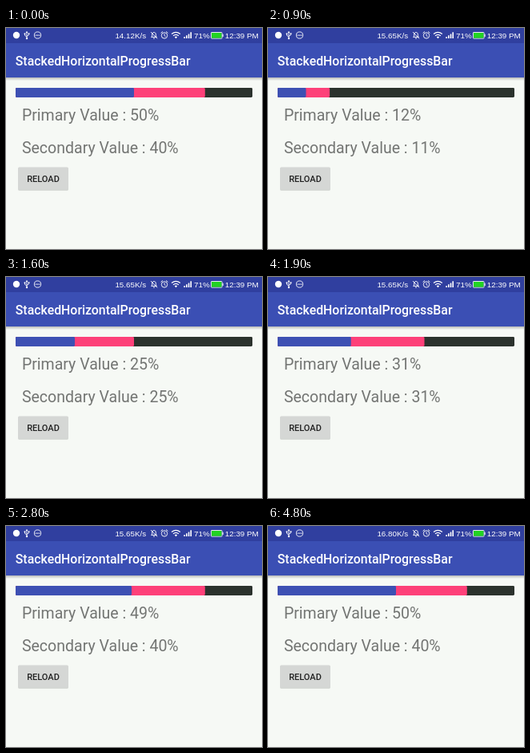
An HTML page that plays this animation: 320x277 px, repeating every 4.9 s.

```html
<!DOCTYPE html>
<html lang="en">
<head>
<meta charset="utf-8">
<title>Stacked progress bar</title>
<style>
  html, body { margin: 0; width: 100%; height: 100%; overflow: hidden; background: #f6f9f5; }
  svg { display: block; width: 100%; height: 100%; font-family: Roboto, "Noto Sans", sans-serif; }
  .status { font: 9.8px "Liberation Sans", Arial, sans-serif; fill: #fff; }
  .title { font-size: 15.85px; font-weight: 500; fill: #fff; }
  .label { font-size: 19.55px; fill: #737573; }
  .button { font-size: 11px; font-weight: 500; fill: #222; }
  .line { fill: none; stroke: #fff; stroke-width: .9; }
  .solid { fill: #fff; }
</style>
</head>
<body>
<svg viewBox="0 0 320 277">
  <defs>
    <linearGradient id="shade" x2="0" y2="1">
      <stop offset="0" stop-color="#000" stop-opacity=".25"/>
      <stop offset="1" stop-color="#000" stop-opacity="0"/>
    </linearGradient>
    <filter id="lift" x="-10%" y="-10%" width="120%" height="130%">
      <feDropShadow dx="0" dy=".8" stdDeviation=".7" flood-opacity=".3"/>
    </filter>
  </defs>

  <rect width="320" height="277" fill="#f6f9f5"/>
  <rect y="62" width="320" height="4" fill="url(#shade)"/>
  <rect width="320" height="62" fill="#3b4fb4"/>
  <rect width="320" height="19" fill="#303f9f"/>

  <!-- status icons, left -->
  <circle class="solid" cx="13" cy="9" r="4.2"/>
  <g class="line">
    <path d="M26 5V13M23.5 7.5V9.3L26 11M28.5 7V8.8L26 10.3"/>
    <circle cx="39.5" cy="9" r="4.1"/>
  </g>
  <path class="solid" d="M24.6 6L26 3.8 27.4 6zM27.7 6.2h1.7v1.7h-1.7z"/>
  <circle class="solid" cx="23.5" cy="7.2" r="1"/>
  <circle class="solid" cx="26" cy="13" r="1.2"/>
  <path class="solid" d="M36.9 8.4h1.3v1.3h-1.3zM38.9 8.4h1.3v1.3h-1.3zM40.9 8.4h1.3v1.3h-1.3z"/>

  <!-- status icons, right -->
  <g class="line">
    <path d="M181.6 11.4H188.4L187.3 10V8C187.3 4.6 182.7 4.6 182.7 8V10ZM184 13H186M181 5L189 13.3"/>
    <circle cx="198" cy="9.4" r="3.7"/>
    <path d="M198 7.3V9.6L199.5 10.6M193.6 6.3L196 4.4M202.4 6.3L200 4.4"/>
    <path d="M207 7.6Q212.4 3.2 217.8 7.6M209 9.7Q212.4 6.9 215.8 9.7" stroke-width="1.3"/>
    <rect x="256.4" y="5.5" width="13.6" height="7.6" rx=".6"/>
  </g>
  <path class="solid" d="M210.7 11.3Q212.4 9.9 214.1 11.3L212.4 13.2zM222.3 11h1.6v2h-1.6zM225 9.3h1.6v3.7h-1.6zM227.7 7.4h1.6v5.6h-1.6zM230.4 5.3h1.6v7.7h-1.6zM270.4 7.7h1.2v3.2h-1.2z"/>
  <rect x="257" y="6" width="12.4" height="6.6" fill="#22d322"/>
  <text id="speed" class="status" x="136.4" y="13">14.12K/s</text>
  <text class="status" x="235" y="13">71%</text>
  <text class="status" x="273.8" y="13">12:39 PM</text>

  <text class="title" x="11.8" y="47">StackedHorizontalProgressBar</text>

  <!-- stacked bar -->
  <rect x="12" y="75" width="296" height="12" rx="1.4" fill="#2b322d"/>
  <rect id="second" x="12" y="75" height="12" rx="1.4" fill="#fd4079"/>
  <rect id="first" x="12" y="75" height="12" rx="1.4" fill="#3d50b3"/>

  <text id="primary" class="label" x="19.9" y="115.8"></text>
  <text id="secondary" class="label" x="19.9" y="157.4"></text>

  <rect x="15" y="174.6" width="63" height="28" rx="1.6" fill="#d5d7d5" filter="url(#lift)"/>
  <text class="button" x="46.5" y="193" text-anchor="middle">RELOAD</text>
</svg>
<script>
  const LOOP = 4900, TICK = 100, START = 300, SPEED_CHANGE = 3200;
  const RATE = 1.945; // percent per tick
  const BAR = 296;
  const el = id => document.getElementById(id);
  const parts = Object.fromEntries(
    ['speed', 'first', 'second', 'primary', 'secondary'].map(id => [id, el(id)]));

  function setText(node, text) {
    if (node.textContent !== text) node.textContent = text;
  }

  function draw(time) {
    const t = time % LOOP;
    const running = t >= START;
    const count = running ? Math.floor((t - START) / TICK) * RATE : 100;
    const p = Math.min(50, Math.round(count));
    const s = Math.min(40, Math.floor(count));

    parts.first.setAttribute('width', BAR * p / 100);
    parts.second.setAttribute('width', BAR * s * 2 / 100);
    setText(parts.primary, `Primary Value : ${p}%`);
    setText(parts.secondary, `Secondary Value : ${s}%`);
    setText(parts.speed, !running ? '14.12K/s' : t < SPEED_CHANGE ? '15.65K/s' : '16.80K/s');
  }

  const begin = performance.now();
  function frame() {
    draw(performance.now() - begin);
    requestAnimationFrame(frame);
  }
  frame();
</script>
</body>
</html>
```
